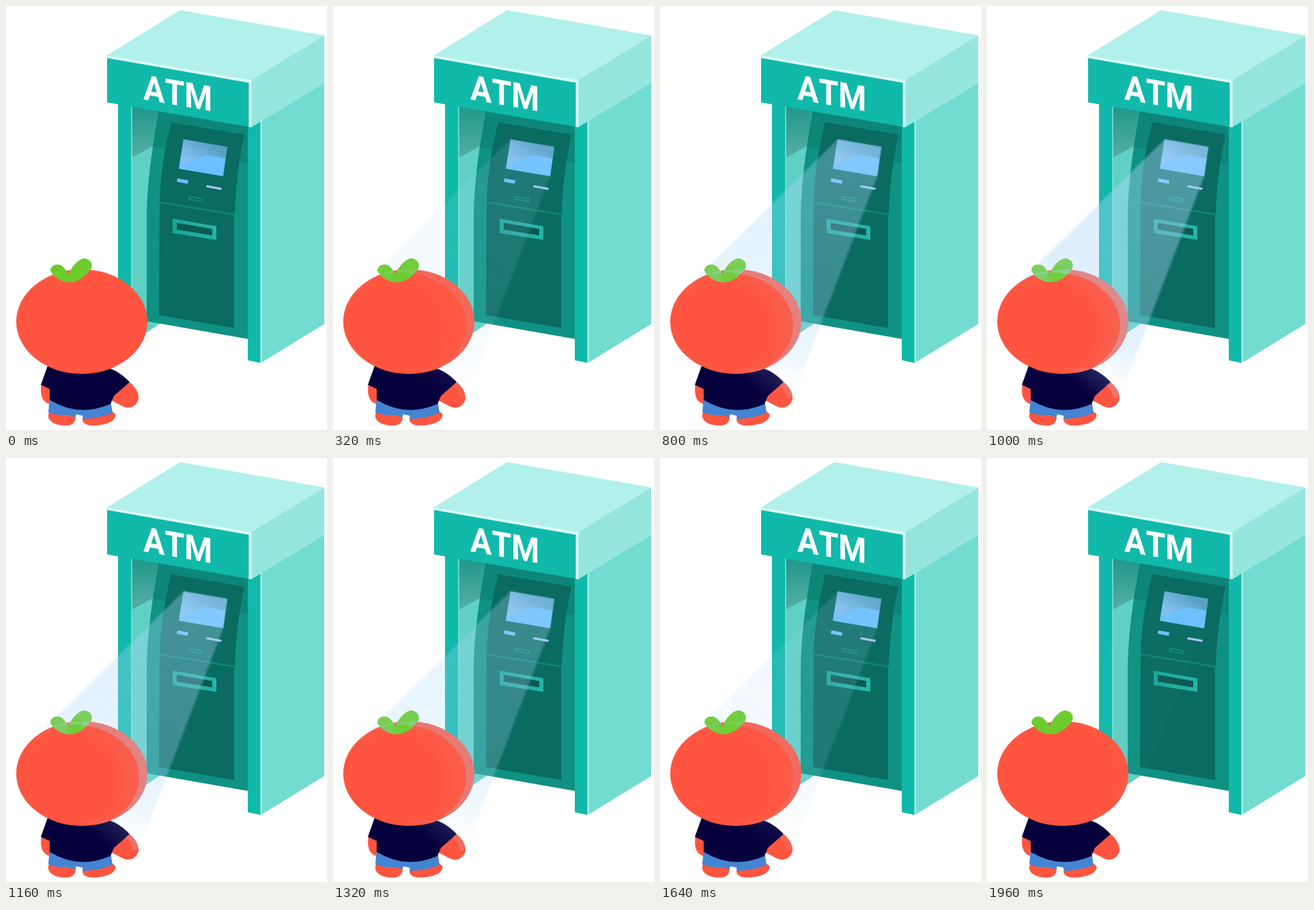
Write an HTML page with a canvas that moves like this. It is 470 px wide and 620 px high and loops after 2 s.

```html
<!DOCTYPE html>
<html lang="en">
<head>
<meta charset="utf-8">
<title>Cash machine</title>
<style>
html, body { margin: 0; width: 100%; height: 100%; overflow: hidden; background: #fff; }
canvas { display: block; width: 470px; height: 620px; }
</style>
</head>
<body>
<canvas id="stage" width="470" height="620"></canvas>
<script>
const ctx = document.getElementById('stage').getContext('2d');
const LOOP = 2000, STEP = 40;
const TEAL = '#10b9aa', RED = '#ff5540', DARK = '#0a6b61';

function fill(d, color) {
  ctx.fillStyle = color;
  ctx.fill(typeof d === 'string' ? new Path2D(d) : d);
}

function line(d, color, width) {
  ctx.strokeStyle = color;
  ctx.lineWidth = width;
  ctx.stroke(new Path2D(d));
}

function addStops(g, stops) {
  stops.forEach(([at, color]) => g.addColorStop(at, color));
  return g;
}

const linear = (x0, y0, x1, y1, ...stops) =>
  addStops(ctx.createLinearGradient(x0, y0, x1, y1), stops);
const radial = (x, y, r0, r1, ...stops) =>
  addStops(ctx.createRadialGradient(x, y, r0, x, y, r1), stops);
const light = a => `rgba(170,215,250,${a})`;

const head = new Path2D();
head.ellipse(111, 461.5, 96, 76.5, 0, 0, Math.PI * 2);

const leaf = new Path2D(
  'M65 387C66 377 79 375 85 383C89 388 92 391 92 394C93 384 106 369 115 369' +
  'C127 371 129 382 121 389C112 399 103 404 92 404C81 403 71 398 65 387Z');
const shirt = new Path2D(
  'M61 526L51 554L64 560V576Q106 602 153 582L158 570L181 550C173 541 163 534 152 530Z');
const hand = new Path2D(
  'M154 570L181 550C190 557 195 567 194 575C190 587 180 590 170 585L153 576Z');

const beam = new Path2D('M260 195L324 206L318 249L195 571L150 590L41 500V410Z');
const beamLight = linear(290, 222, 103, 506,
  [0, light(.43)], [.7, light(.37)], [.85, light(.25)], [1, light(0)]);

function drawBooth() {
  fill('M255 6L466 43L358 109L148 72Z', '#b2f0ec');
  fill('M373 165L466 110V465L373 522Z', '#72dcd0');

  // recess: inner wall, then the machine body
  fill('M184 146H226V464L184 492Z', '#60d0c4');
  fill('M184 146H226V199L184 222Z',
    linear(196, 150, 200, 216, [0, '#23988b'], [1, '#51ada3']));
  fill('M224 152L355 176V487L206 461V310C206 260 215 200 224 152Z', '#0f9284');
  fill('M224 152L355 176V230L215 206Z', '#0d8679');

  fill('M242 170L349 188C341 225 336 266 335 304L225 286C226 246 233 205 242 170Z', DARK);
  fill('M225 288L334 306V471L224 452Z', DARK);
  line('M225 287L335 305', '#0f8477', 2);

  fill('M260 195L324 206L318 249L253 238Z', '#6cc0ff');
  fill('M260 195L324 206L321.5 223L292 218L254 233Z',
    linear(296, 200, 274, 230, [0, 'rgba(72,135,145,.55)'], [1, 'rgba(150,190,225,.55)']));
  fill('M251 252L267 255L266 260L250 257Z', '#76bdff');
  fill('M294 262L316 266L315 269L293 265Z', '#a5c8f5');
  line('M268 278.5L287.5 282L287 286L267 282.5Z', '#14a090', 1);
  fill('M244 311L308 322V342L244 332Z',
    linear(244, 330, 308, 322, [0, '#1aa596'], [1, '#25b6a7']));
  fill('M250 317L302 326V335.5L250 327Z', '#0b5a52');

  fill('M164 140H184V492H164Z', TEAL);
  line('M184 147V480', '#7ee3d8', 1.5);
  fill('M354 174L373 167V522L354 518Z', TEAL);
  line('M373.5 168V522', '#b8f3ee', 2);

  fill('M358 109L466 43V113L358 178Z', '#94e6df');
  fill('M148 72L358 109V177L148 141Z', TEAL);
  line('M148 74L357.5 110.5V177', '#dcfbf8', 4);

  // lettering lies on the sign's tilted plane
  ctx.save();
  ctx.transform(.915, .16, 0, 1, 201, 136.5);
  ctx.font = '700 51px Roboto, sans-serif';
  ctx.fontKerning = 'none';
  ctx.fillStyle = '#fff';
  ctx.fillText('ATM', 0, 0);
  ctx.restore();
}

function drawFigure() {
  fill('M52 553L65 559V582C54 581 49 569 52 553Z', RED);
  fill(hand, RED);
  fill('M63 594C59 603 66 611 80 613C94 615 102 612 102 600Z', RED);
  fill('M112 602C111 611 119 615 135 613C154 611 162 604 160 596L154 592Z', RED);
  fill('M64 572L62 594Q72 599 85 598Q94 598 101 602L103 597L112 599L113 604Q136 603 156 595L153 576Z',
    '#4484d2');
  fill(shirt, '#06003c');
  fill(head, RED);
  fill(leaf, '#6dcc2c');
}

function litInside(shape, color) {
  ctx.save();
  ctx.clip(shape);
  fill(beam, color);
  ctx.restore();
}

// light along the edge of a shape, on the side facing the screen
function litRim(shape, dx, dy, color) {
  const rim = new Path2D('M0 0H470V620H0Z');
  rim.addPath(shape, new DOMMatrix([1, 0, 0, 1, dx, dy]));
  ctx.save();
  ctx.clip(rim, 'evenodd');
  litInside(shape, color);
  ctx.restore();
}

const headGlow = radial(92, 474, 65, 112, [0, light(0)], [1, light(.13)]);
const leafGlow = radial(101, 394, 8, 16, [0, light(.04)], [1, light(.27)]);
const bodyGlow = linear(180, 535, 150, 570, [0, light(.22)], [1, light(0)]);

function draw(now) {
  const t = Math.floor((now % LOOP) / STEP) * STEP;
  const glow = 1 - Math.abs(t / (LOOP / 2) - 1);

  ctx.globalAlpha = 1;
  ctx.fillStyle = '#fff';
  ctx.fillRect(0, 0, 470, 620);
  drawBooth();

  ctx.globalAlpha = glow;
  ctx.filter = 'blur(1.5px)';
  fill(beam, beamLight);
  ctx.filter = 'none';
  ctx.globalAlpha = 1;
  drawFigure();

  ctx.globalAlpha = glow;
  litInside(shirt, bodyGlow);
  litInside(head, headGlow);
  litInside(leaf, leafGlow);
  litRim(head, -12, 5, light(.33));
  litRim(hand, -8, 3, light(.25));
}

const start = performance.now();
function tick() {
  draw(performance.now() - start);
  requestAnimationFrame(tick);
}
tick();
</script>
</body>
</html>
```
